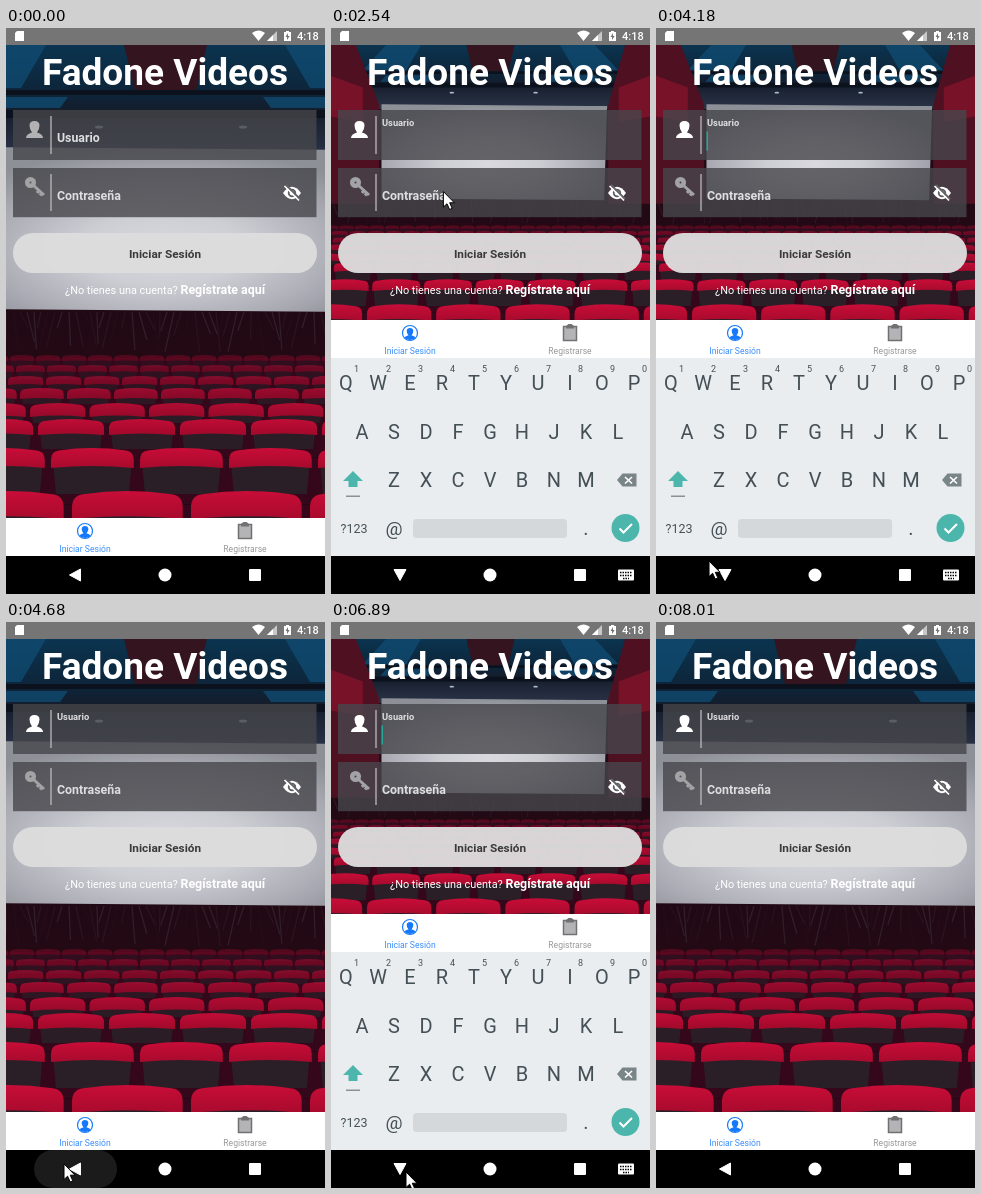
An HTML page that plays this animation: 319 px wide and 566 px high, repeating every 8.04 s.

```html
<!DOCTYPE html>
<html lang="es">
<head>
<meta charset="utf-8">
<style>
  html, body { margin: 0; height: 100%; overflow: hidden; background: #fff; }
  svg { display: block; width: 100vw; height: 100vh; font-family: Roboto, sans-serif; }
  .b { font-weight: 700; }
  .m { text-anchor: middle; }
</style>
</head>
<body>
<svg viewBox="0 0 319 566">
  <defs>
    <clipPath id="photoClip"><rect x="-115" y="17" width="549" height="473"/></clipPath>
    <linearGradient id="ceiling" x2="0" y2="1">
      <stop stop-color="#0b3450"/><stop offset=".45" stop-color="#0d2438"/>
      <stop offset=".6" stop-color="#151d2c"/><stop offset="1" stop-color="#2b3447"/>
    </linearGradient>
    <radialGradient id="screen" cx=".48" cy=".62" r=".62">
      <stop stop-color="#d9d9df"/><stop offset=".35" stop-color="#cdcdd4"/>
      <stop offset=".7" stop-color="#aeaeb7"/><stop offset="1" stop-color="#8d9097"/>
    </radialGradient>
    <linearGradient id="curtainFade" x2="0" y2="1">
      <stop stop-color="#1d0d18"/><stop offset="1" stop-color="#250712"/>
    </linearGradient>
    <linearGradient id="seat" x2="0" y2="1">
      <stop stop-color="#c80d38"/><stop offset="1" stop-color="#a80a2d"/>
    </linearGradient>
  </defs>
  <rect width="319" height="566" fill="#fff"/>

  <g id="photo"><g clip-path="url(#photoClip)">
    <rect x="-115" y="17" width="549" height="473" fill="url(#curtainFade)"/>
    <rect x="-115" y="17" width="549" height="110" fill="url(#ceiling)"/>
    <path d="M118 17H201L190 62H129Z" fill="#34141f"/>
    <path d="M-20 17H40L15 60H-60ZM279 17H339L379 60H304ZM-20 69H62L54 80H-30ZM257 69H339L349 80H265Z" fill="#104a70" opacity=".8"/>
    <path d="M-115 62H434V67H-115ZM-115 82H434V90H-115Z" fill="#0c121d"/>
    <path d="M-115 17H-72L-32 120V290H-115ZM434 17H391L362 120V290H434Z" fill="#4f1021"/>
    <path d="M-115 70L-60 90V150L-115 140ZM434 70L380 90V150L434 140Z" fill="#781229"/>
    <path d="M-28 119L360 122L355 284L-28 281Z" fill="url(#screen)"/>
    <g fill="#a9bccb"><ellipse cx="93" cy="99" rx="4" ry="1.5"/><ellipse cx="237" cy="99" rx="4" ry="1.5"/></g>
    <g id="curtain" stroke="#33222c" stroke-width="1.300"></g>
    <g id="seats"></g>
  </g></g>

  <rect width="319" height="17" fill="#757575"/>
  <g fill="#fff">
    <path d="M11 3H18V13H9V5Z"/>
    <path d="M246 5Q252 0 259 5L252.500 13Z"/>
    <path d="M271 3V13H261Z" opacity=".6"/><path d="M267 7V13H261Z"/>
    <path d="M278 4H280V3H283V4H285V13H278Z"/>
    <path d="M282 5L279.500 9H281V12L283.700 8H282Z" fill="#757575"/>
    <text x="291" y="12" font-size="11" font-weight="500">4:18</text>
    <text class="b m" x="159" y="57" font-size="37">Fadone Videos</text>
  </g>

  <g fill="#46464b" fill-opacity=".8"><rect x="7" y="82" width="303.500" height="50"/><rect x="7" y="140" width="303.500" height="49.200"/></g>
  <path d="M45 88V126M45 146V183" stroke="#c4c4c6" stroke-width="1.200"/>
  <path id="user" d="M20 110Q20 106 26 104.500Q23.500 101 23.500 97.500Q23.500 93 28.500 93Q33.500 93 33.500 97.500Q33.500 101 31 104.500Q37 106 37 110Z"/>
  <g fill="none" stroke="#a3a3a5"><circle cx="24.500" cy="154.500" r="3.300" stroke-width="4.500"/><path d="M27 157L38 167M33 162.500L31 165M36 165L34 167.500" stroke-width="3"/></g>
  <g class="b" fill="#dedee0">
    <text id="label" x="51">Usuario</text>
    <text x="51" y="171.500" font-size="12.400">Contraseña</text>
  </g>
  <rect id="caret" x="50.500" y="103.500" width="1.500" height="19" fill="#26a69a"/>
  <g stroke="#626266" fill="#fff">
    <path d="M277 165Q286 152.500 295 165Q286 177.500 277 165Z" stroke="none"/>
    <circle cx="286" cy="165" r="3.300" stroke-width="1.800"/>
    <path d="M280 157L294 171" stroke-width="2"/><path d="M278.500 158L293 172.500" stroke="#fff" stroke-width="1.600"/>
  </g>
  <rect x="7" y="205" width="304" height="40" rx="20" fill="#dddddd" fill-opacity=".96"/>
  <text class="b m" x="159" y="229.700" font-size="11.800" fill="#3a3a3c">Iniciar Sesión</text>
  <g fill="#fff">
    <text x="59" y="265.500" font-size="10.900">¿No tienes una cuenta?</text>
    <text class="b" x="174.500" y="265.500" font-size="12.400">Regístrate aquí</text>
  </g>

  <g id="tabs">
    <rect y="490" width="319" height="38" fill="#fff"/>
    <circle cx="79" cy="503" r="7.500" fill="none" stroke="#1479fb" stroke-width="1.200"/>
    <path d="M73.500 508Q74 506 77.500 505.500Q75.500 503 75.700 500.500Q76 498 79 498Q82 498 82.300 500.500Q82.500 503 80.500 505.500Q84 506 84.500 508Q79 512 73.500 508Z" fill="#1479fb"/>
    <path d="M232.500 496.500H245.500V510.500H232.500Z" fill="#b4b4b7" stroke="#717174" stroke-width="1.500"/><path d="M235 498.500V496L237.500 494H240.500L243 496V498.500Z" fill="#717174"/>
    <text class="m" x="79" y="524" font-size="8.600" fill="#3a8efb">Iniciar Sesión</text>
    <text class="m" x="239" y="524" font-size="8.600" fill="#98989b">Registrarse</text>
  </g>
  <rect id="blank" y="330" width="319" height="198" fill="#fff"/>

  <rect y="528" width="319" height="38"/>
  <rect id="ripple" x="28" y="528" width="83" height="38" rx="19" fill="#fff"/>
  <g fill="#fff">
    <path id="back" d="M63.500 547L74.500 541V553Z" stroke="#fff" stroke-linejoin="round"/>
    <circle cx="159" cy="547" r="6.500"/><rect x="243" y="541" width="12" height="12" rx="1"/>
    <g id="imeIcon"><rect x="287" y="541.500" width="16" height="11" rx="1"/><path d="M289 544.500H301M289 547.500H301M292 550.500H298" stroke="#000" stroke-width="1.500" stroke-dasharray="1.500 1"/></g>
  </g>

  <g id="keyboard" fill="#455056">
    <rect y="330" width="319" height="198" fill="#e9edf0"/>
    <g id="keys" class="m"></g>
    <path d="M22 443L32 453H26.500V459H17.500V453H12Z" fill="#4db6ac"/><rect x="15" y="467.500" width="14" height="1.500" fill="#8a9296"/>
    <path d="M286 452L291.500 445.500H305.500V458.500H291.500Z" fill="#7a858a"/><path d="M294 449L301 455.500M301 449L294 455.500" stroke="#fff" stroke-width="1.600"/>
    <rect x="82" y="491" width="154" height="19" rx="3.500" fill="#d4d8da"/>
    <circle cx="294.500" cy="500" r="14" fill="#4db6ac"/><path d="M288.500 500.500L292.500 504.500L301 496" fill="none" stroke="#fff" stroke-width="2"/>
  </g>
  <path id="cursor" d="M0 0V15.500L3.600 12.200L6.200 18L8.800 16.800L6.300 11.200H11Z" fill="#fff" stroke="#000"/>
</svg>
<script>
const $ = id => document.getElementById(id);
const set = (id, attrs) => { for (const k in attrs) $(id).setAttribute(k, attrs[k]); };
const show = (id, on) => set(id, { visibility: on ? 'visible' : 'hidden' });
const clamp = v => Math.max(0, Math.min(1, v));

// Scenery: curtain folds, then seat rows from far to near
let folds = '', seats = '';
for (let x = -112; x < 434; x += 7) {
  folds += `<path d="M${x} 284L${x + 9 * Math.sin(x)} ${312 + 12 * Math.sin(x * 3)}" opacity="${.55 + .4 * Math.sin(x * 7)}"/>`;
}
$('curtain').innerHTML = folds;

function seatRow(y, pitch, x0, h, depth, light) {
  seats += `<rect x="-115" y="${y + h * .5}" width="549" height="${depth}" fill="#35071a"/><g opacity="${light}">`;
  const w = pitch * .93, r = h * .4;
  for (let x = x0 - Math.ceil((x0 + 115) / pitch) * pitch; x < 434; x += pitch) {
    seats += `<path d="M${x + w * .02} ${y + h * .5}H${x + w * .98}L${x + w * .94} ${y + depth}H${x + w * .06}Z" fill="#2a1f27"/>` +
      `<path d="M${x} ${y + h}V${y + r * 1.5}Q${x} ${y + r * .4} ${x + r} ${y + r * .3}Q${x + w / 2} ${y - r * .3} ${x + w - r} ${y + r * .3}Q${x + w} ${y + r * .4} ${x + w} ${y + r * 1.5}V${y + h}Q${x + w / 2} ${y + h * .8} ${x} ${y + h}Z" fill="url(#seat)"/>`;
  }
  seats += '</g>';
}
seatRow(327, 26, 4, 6, 12, .3);
seatRow(337, 31, 10, 7, 14, .42);
seatRow(348, 38, 2, 9, 14, .55);
seatRow(360, 47, 14, 11, 16, .7);
seatRow(375, 59.5, 24, 14, 20, .85);
seatRow(391, 71, 32, 16, 30, .95);
seatRow(420, 89, 45, 20, 46, 1);
seatRow(463, 119, 66, 28, 40, 1);
$('seats').innerHTML = seats;

// Keyboard letters
const key = (s, x, y, size = 20) => `<text x="${x}" y="${y}" font-size="${size}">${s}</text>`;
const keyRow = (letters, x, y) => [...letters].map((c, i) => key(c, x + 32 * i, y)).join('');
$('keys').innerHTML = keyRow('QWERTYUIOP', 15, 361.5) + keyRow('ASDFGHJKL', 31, 410.5) + keyRow('ZXCVBNM', 63, 459) +
  [...'1234567890'].map((c, i) => key(c, 25.5 + 32 * i, 344, 9)).join('') +
  key('?123', 23, 505, 12.5) + key('@', 63, 507, 19) + key('.', 255, 507);

const LOOP = 8040;
const sessions = [ // keyboard rises, page reflows, back tapped, keyboard falls
  { rise: 1290, reflow: 1490, tap: 4450, fall: 4500 },
  { rise: 5870, reflow: 6000, tap: 7070, fall: 7120 }
];
const FALL = 130;
const path = [ // time, x, y of the pointer tip
  [490, 302, 162], [580, 160, 116], [830, 160, 116], [900, 155, 116], [1870, 155, 116], [2080, 161, 327],
  [2230, 161, 327], [2340, 249, 363], [2540, 113, 163], [2680, 26, 240], [2830, 120, 330], [3020, 205, 347],
  [3040, 205, 347], [3490, 157, 300], [3700, 157, 300], [3840, 33, 513], [4020, 33, 513], [4180, 53, 533],
  [4300, 58, 542], [4700, 58, 542], [4870, 109, 165], [5140, 109, 165], [5200, 102, 147], [5410, 102, 147],
  [5650, 80, 120], [5950, 80, 120], [6120, 80, 235], [6300, 80, 235], [6460, 47, 475], [6610, 47, 475],
  [6890, 75, 550], [LOOP, 75, 550]
];

function pointer(t) {
  const i = Math.max(1, path.findIndex(p => p[0] > t));
  const [a, b] = [path[i - 1], path[i]], p = clamp((t - a[0]) / (b[0] - a[0]));
  return [1, 2].map(k => a[k] + (b[k] - a[k]) * p);
}

function draw(t) {
  const second = t >= 5870, s = sessions[+second];
  const opened = t >= s.rise && t < s.fall + FALL;
  const compact = opened && t >= s.reflow;
  const keysUp = t >= s.rise && t < s.fall;

  set('photo', { transform: compact ? 'translate(159.5 17) scale(.5814) translate(-159.5 -17)' : '' });
  set('tabs', { transform: compact ? 'translate(0 -198)' : '' });
  show('blank', opened);

  const left = t < s.fall ? (1 - clamp((t - s.rise) / 200)) ** 2 : clamp((t - s.fall) / FALL) ** 2;
  show('keyboard', opened);
  set('keyboard', { transform: `translate(0 ${52 * left})`, opacity: 1 - left });
  set('back', { transform: keysUp ? 'rotate(-90 69 547)' : '' });
  show('imeIcon', keysUp);

  const since = t - s.tap;
  set('ripple', { opacity: since < 0 ? 0 : .14 * clamp(since / 80) * clamp((420 - since) / 250) });

  const focused = t >= 900, floated = t >= 1490;
  set('user', { fill: focused ? '#fff' : '#b2b2b4', transform: `translate(0 ${focused && !floated ? 21 : 0})` });
  show('label', !focused || floated);
  set('label', floated ? { y: 98, 'font-size': 9.3 } : { y: 114, 'font-size': 12.3 });
  // The second tap restarts the caret's blink
  show('caret', focused && Math.floor((t - 10) / 500) % 2 === +second);

  show('cursor', t >= 490 && t < 7340);
  set('cursor', { transform: `translate(${pointer(t)})` });
}

(function frame() {
  draw(performance.now() % LOOP);
  requestAnimationFrame(frame);
})();
</script>
</body>
</html>
```
